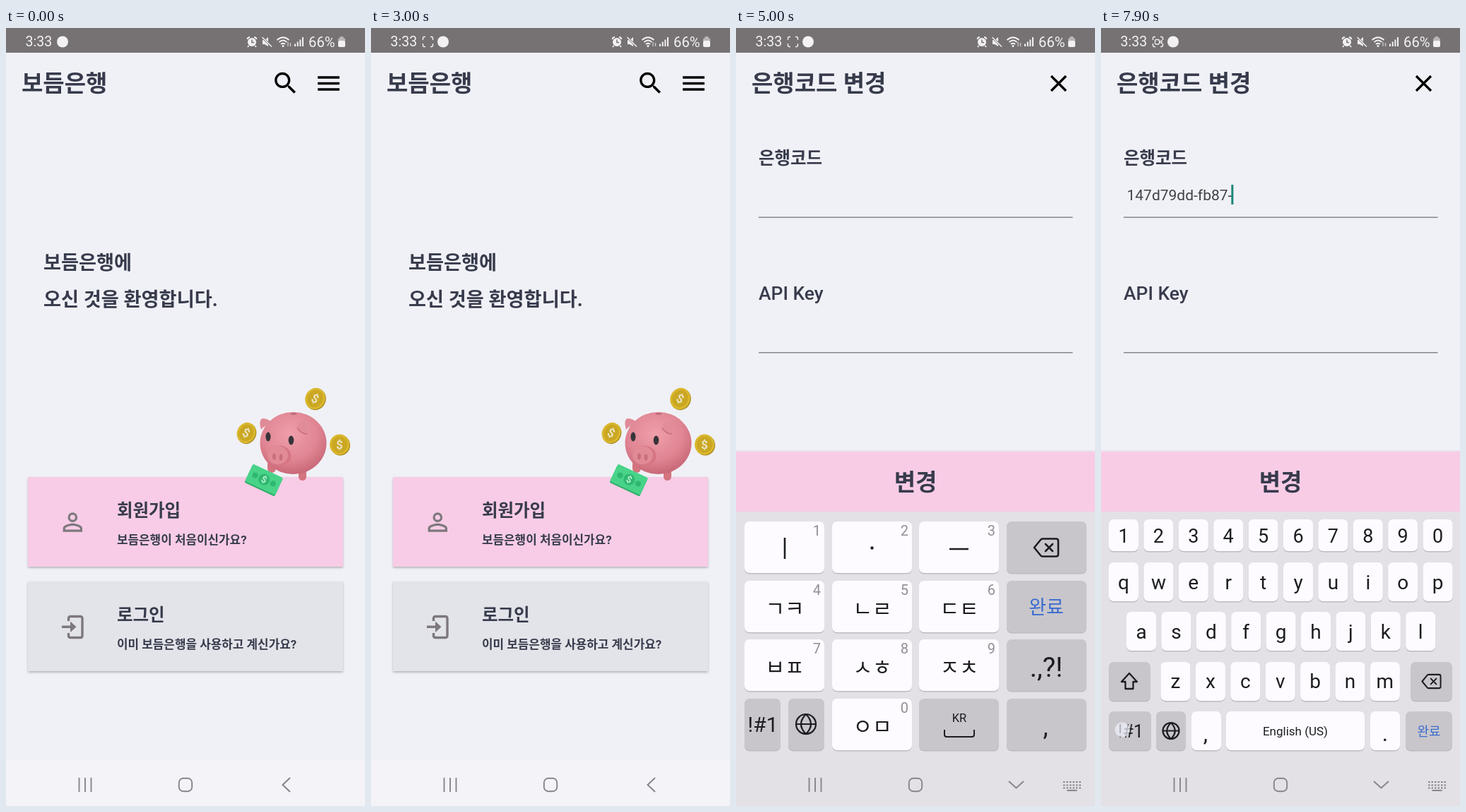
Write an HTML page that moves like this. It is 508 by 1102 pixels and loops after 8 s.

```html
<!DOCTYPE html>
<html lang="ko">
<head>
<meta charset="utf-8">
<title>보듬은행</title>
<style>
html, body { margin: 0; width: 100%; height: 100%; overflow: hidden; background: #f0f1f6; }
svg { display: block; width: 508px; height: 1102px; font-family: Roboto, "Noto Sans CJK KR", "Noto Sans CJK", sans-serif; }
text { white-space: pre; }
</style>
</head>
<body>
<svg id="stage" viewBox="0 0 508 1102" xmlns="http://www.w3.org/2000/svg"></svg>
<script>
const INK = '#373b4c', KEY = '#fdfbff', GREY = '#c8c6cb', DARK = '#1d1d20', BLUE = '#3a6bcf';
const LOOP = 8000;

// --- drawing helpers ---
const text = (x, y, size, str, fill = INK, weight = 400, anchor = 'start') =>
  `<text x="${x}" y="${y}" font-size="${size}" fill="${fill}" font-weight="${weight}" text-anchor="${anchor}">${str}</text>`;
// Hangul centred vertically on cy
const bold = (x, cy, size, str, anchor) => text(x, cy + size * .37, size, str, INK, 600, anchor);
const mid = (x, y, size, str, fill = DARK, weight) => text(x, y, size, str, fill, weight, 'middle');
const rect = (x, y, w, h, fill, rx = 0, extra = '') =>
  `<rect x="${x}" y="${y}" width="${w}" height="${h}" rx="${rx}" fill="${fill}" ${extra}/>`;
const oval = (x, y, rx, ry, fill, turn = 0) =>
  `<ellipse cx="${x}" cy="${y}" rx="${rx}" ry="${ry}" fill="${fill}" transform="rotate(${turn} ${x} ${y})"/>`;
const line = (d, color, w, extra = '') =>
  `<path d="${d}" fill="none" stroke="${color}" stroke-width="${w}" ${extra}/>`;
const icon = (x, y, d, fill = '#000') =>
  `<path transform="translate(${x} ${y}) scale(1.71)" d="${d}" fill="${fill}"/>`;
const group = (id, body) => `<g id="${id}">${body}</g>`;
const round = 'stroke-linecap="round" stroke-linejoin="round"';

// --- app pages ---
const menu = icon(436, 58, 'M3 18h18v-2H3v2zm0-5h18v-2H3v2zm0-7v2h18V6H3z');

const coin = (x, y, rx, ry, turn) =>
  oval(x + 1, y + 1, rx, ry, '#a98a1e', turn) + oval(x, y, rx, ry, '#d9b72e', turn) +
  oval(x, y, rx - 3, ry - 3, '#cba722', turn) +
  `<g transform="rotate(${turn} ${x} ${y})">${mid(x, y + 6, 17, '$', '#e9e2c0', 700)}</g>`;

const pig =
  coin(437.5, 525, 14, 15.5, 25) + coin(340, 573.5, 13, 15, 25) + coin(472, 590, 14, 14.5, 0) +
  rect(370, 612, 12, 18, '#d4747f', 6) + rect(414, 622, 11, 19, '#d4747f', 5.5) +
  oval(406.5, 588, 47, 44, 'url(#skin)') +
  `<path d="M361 569Q357 555 363 553Q372 553 378 561Q366 562 361 569Z" fill="#e08b97"/>` +
  `<path d="M411 566Q415 556 424 557Q429 567 426 575Q420 576 411 566Z" fill="#e18d99"/>` +
  line('M412 567Q420 576 426 575', '#c96b79', 1.5) +
  oval(407, 546.5, 4.5, 1.4, '#c06a78') +
  oval(371, 579, 3.5, 6.5, '#37343a') + oval(403.5, 584, 3.8, 6.5, '#37343a') +
  oval(386.5, 606, 17, 14.5, '#d67684') + oval(384.5, 605, 14.5, 13, '#e18b97') +
  oval(379.5, 607, 2.3, 4.5, '#c76d7b') + oval(389, 608, 2.3, 4.5, '#c76d7b') +
  `<g transform="translate(365 640) rotate(25)">` +
  rect(-23.5, -12, 47, 27, '#2eae68', 2) + rect(-23.5, -14, 47, 27, '#48d389', 2) +
  oval(0, -.5, 8, 8, '#2fb870') + oval(-14, -.5, 4, 4, '#2fb870') + oval(14, -.5, 4, 4, '#2fb870') +
  mid(0, 4, 13, '$', '#b9f3d2', 700) + `</g>`;

const card = (y, fill, title, note) =>
  rect(31, y, 446, 127, fill, 1, 'filter="url(#drop)"') + bold(157, y + 47, 24.5, title) + bold(157, y + 89, 16.9, note);

const home =
  bold(22, 78, 33, '보듬은행') + menu +
  icon(375, 57.7, 'M15.5 14h-.79l-.28-.27C15.41 12.59 16 11.11 16 9.5 16 5.91 13.09 3 9.5 3S3 5.91 3 9.5 5.91 16 9.5 16c1.61 0 3.09-.59 4.23-1.57l.27.28v.79l5 4.99L20.49 19l-4.99-5zm-6 0C7.01 14 5 11.99 5 9.5S7.01 5 9.5 5 14 7.01 14 9.5 11.99 14 9.5 14z') +
  bold(53, 332, 27.2, '보듬은행에') + bold(53, 384, 27.2, '오신 것을 환영합니다.') +
  card(636, '#f8cce6', '회원가입', '보듬은행이 처음이신가요?') +
  card(784, '#e3e4e9', '로그인', '이미 보듬은행을 사용하고 계신가요?') +
  icon(73.8, 679.5, 'M12 5.9a2.1 2.1 0 1 1 0 4.2a2.1 2.1 0 0 1 0-4.2m0 9c2.97 0 6.1 1.46 6.1 2.1v1.1H5.9V17c0-.64 3.13-2.1 6.1-2.1M12 4a4 4 0 1 0 0 8a4 4 0 0 0 0-8zm0 9c-2.67 0-8 1.34-8 4v3h16v-3c0-2.66-5.33-4-8-4z', '#7d787d') +
  line('M88.5 840V836.5q0-3 3-3H105q3 0 3 3V860.500q0 3-3 3H91.5q-3 0-3-3V857', '#7d787d', 3.4) +
  `<path d="M79 846.4H91V840.5L99.5 848.2L91 856V850H79Z" fill="#7d787d"/>` + pig;

const row = (y, label) =>
  bold(32, y, 24.5, label) + line(`M452 ${y - 10}L461 ${y - 1}L452 ${y + 8}`, '#a09da4', 3.5) +
  rect(32, y + 40.2, 445, 1.7, '#c9c9cf');

const settings =
  line('M45.5 69L37 78L45.5 87', '#000', 3.4) + bold(62, 78, 33, '설정') + menu +
  icon(374.5, 58, 'M12 5.69l5 4.5V18h-2v-6H9v6H7v-7.81l5-4.5M12 3L2 12h3v8h6v-6h2v6h6v-8h3L12 3z') +
  row(174, '알림설정') + row(280, '앱 환경설정') + row(386, '은행코드 변경 (관리자 전용)');

const form =
  bold(22, 78, 33, '은행코드 변경') + line('M446 68L467 89M467 68L446 89', '#000', 3.3) +
  bold(32, 184, 24.5, '은행코드') + rect(32, 267.4, 444.5, 1.6, '#8d8c94') +
  text(32, 385, 26.4, 'API Key', INK, 500) + rect(32, 459, 444.5, 1.6, '#8d8c94') +
  '<text id="typed" x="36.5" y="244" font-size="21" fill="#414148"></text>' +
  rect(0, 222, 3, 28, '#1b8576', 0, 'id="caret"');

// --- keyboards ---
const spots = {};
const cap = (x, y, w, h, fill = KEY) => rect(x, y + 1.5, w, h, '#bdbbc1', 7) + rect(x, y, w, h, fill, 7);
const globe = (x, y, r) =>
  line(`M${x - r} ${y}A${r} ${r} 0 1 1 ${x + r} ${y}A${r} ${r} 0 1 1 ${x - r} ${y}H${x + r}` +
    `M${x} ${y - r}Q${x - r} ${y} ${x} ${y + r}Q${x + r} ${y} ${x} ${y - r}`, DARK, 2.2);
const erase = (x, y, k) =>
  `<g transform="translate(${x} ${y}) scale(${k})">` +
  line('M-17 0L-8-11Q-7-12.5-5-12.5H14Q17-12.5 17-9.5V9.5Q17 12.5 14 12.5H-5Q-7 12.5-8 11ZM-1-5L9 5M9-5L-1 5', DARK, 2.6, round) + '</g>';

function hangulKeys() {
  const cols = [12, 136, 259, 383], rows = [699, 783, 866, 950];
  const labels = ['', '', '', 'ㄱㅋ', 'ㄴㄹ', 'ㄷㅌ', 'ㅂㅍ', 'ㅅㅎ', 'ㅈㅊ'];
  let out = '';
  const key = (x, y, label, digit) =>
    cap(x, y, 113, 73) + mid(x + 57, y + 50, 30, label) + text(x + 108, y + 20, 20, digit, '#918f95', 400, 'end');
  labels.forEach((s, i) => out += key(cols[i % 3], rows[i / 3 | 0], s, i + 1));
  out += line('M69 722V752M302 738H329', DARK, 2.6) + oval(192.5, 736.5, 2.2, 2.2, DARK);
  rows.slice(0, 3).forEach(y => out += cap(383, y, 113, 73, GREY));
  out += erase(439, 736, 1) + mid(439, 830, 27, '완료', BLUE) + mid(439, 919, 39, '.,?!');
  out += cap(12, 950, 51, 73, GREY) + mid(38, 997, 30, '!#1') + cap(74, 950, 51, 73, GREY) + globe(99, 986, 14);
  out += key(136, 950, 'ㅇㅁ', 0) + cap(259, 950, 113, 73, GREY) + mid(316, 983, 16.5, 'KR');
  out += line('M295 994V1001Q295 1004 298 1004H334Q337 1004 337 1001V994', DARK, 2);
  return out + cap(383, 950, 113, 73, GREY) + mid(438, 1002, 36, ',');
}

function latinKeys() {
  let out = '';
  [['1234567890', 11, 696, 45, 27, 33], ['qwertyuiop', 11, 757, 55, 28, 38],
   ['asdfghjkl', 36, 827, 55, 28, 38], ['zxcvbnm', 84.5, 898, 55, 28, 37]].forEach(([chars, x0, y, h, size, base]) => {
    [...chars].forEach((c, i) => {
      const x = x0 + i * 49.4;
      spots[c] = [x + 21, y + h / 2];
      out += cap(x, y, 42, h) + mid(x + 21, y + base, size, c);
    });
  });
  out += cap(11, 898, 59, 55, GREY) + line('M40 914L51 926H45.5V936H34.5V926H29Z', DARK, 2.3, round);
  out += cap(438, 898, 59, 55, GREY) + erase(467.5, 925.5, .77);
  out += cap(11, 968, 60, 55, GREY) + mid(42, 1005, 25, '!#1') + cap(78, 968, 42, 55, GREY) + globe(99, 995.5, 11.5);
  out += cap(128, 968, 42, 55) + mid(148, 1010, 32, ',') + cap(177, 968, 196, 55) + mid(275, 1001.5, 17, 'English (US)');
  out += cap(381, 968, 42, 55) + mid(402, 1010, 32, '.') + cap(431, 968, 66, 55, GREY);
  return out + mid(464, 1002.5, 18, '완료', BLUE);
}

const panel =
  rect(0, 598, 508, 2, '#e9e4ec') + rect(0, 600, 508, 85, '#f9cce6') + bold(254, 642.5, 33, '변경', 'middle') +
  rect(0, 685, 508, 417, '#e3e1e6') + group('hangul', hangulKeys()) + group('latin', latinKeys());

// --- system bars ---
const NAV = '#87848b';
const nav =
  rect(0, 1037, 508, 65, '#f4f3f8', 0, 'id="navbg"') +
  line('M103.5 1062V1082M112 1062V1082M120.5 1062V1082', NAV, 1.9) +
  rect(244.8, 1062.8, 18.4, 18.4, 'none', 6, `stroke="${NAV}" stroke-width="1.9"`) +
  group('back', line('M402 1062L391.5 1072L402 1082', NAV, 2)) +
  group('hide', line('M386 1067L396.5 1076.5L407 1067', NAV, 2) +
    line('M463 1068H488M463 1072.5H488M463 1076.5H488', NAV, 2, 'stroke-dasharray="2.5 2"') +
    line('M468.5 1080H482.5', NAV, 2));

const PALE = '#f3f1f2', BAR = '#767274';
const status =
  rect(0, 0, 508, 35, BAR) + text(27.5, 26, 19.5, '3:33', PALE) + text(428, 26.5, 20.3, '66%', PALE) +
  `<circle id="carrier" cx="80" cy="19.5" r="8" fill="${PALE}"/>` +
  group('rec', line('M73.5 17V14.5Q73.5 12.5 75.5 12.5H77M84 12.5H85.5Q87.5 12.5 87.5 14.5V17M87.5 22V24.5Q87.5 26.5 85.5 26.5H84M77 26.5H75.5Q73.5 26.5 73.5 24.5V22', PALE, 1.4)) +
  group('cam', rect(76.5, 16.5, 6, 6.5, 'none', 1.5, `stroke="${PALE}" stroke-width="1.3"`) +
    line('M83 19.8L86 17.5V22Z', PALE, 1.1)) +
  oval(348, 20, 6, 6, PALE) + line('M341.5 16Q342 13 345 13M351 13Q354 13 354.5 16M343.5 25L342 27M352.5 25L354 27', PALE, 1.8) +
  line('M348 16.5V20.5H351', BAR, 1.5) +
  `<path d="M363 17H366L371 13V26L366 23H363Z" fill="${PALE}"/>` + line('M362 12.5L376 26.5', BAR, 3) +
  line('M362.5 13L376 26.5', PALE, 1.5) +
  line('M383.5 17Q392 9.5 400.5 17M386.5 20Q392 15 397.5 20M389 23Q392 20.5 395 23', PALE, 1.7) +
  oval(392, 25.5, 1.5, 1.5, PALE) + line('M399 26V20M402.5 21V26', '#cfcccd', 1.3) +
  line('M409 26V22.5M412.7 26V19.5M416.4 26V16.5M420 26V13', PALE, 2) +
  rect(472.5, 12, 5, 3, '#b9b6b7', 1) + rect(470, 14, 10, 13, '#b9b6b7', 2.5) + rect(470, 18, 10, 9, PALE, 2.5);

const stage = document.getElementById('stage');
stage.innerHTML =
  `<defs><radialGradient id="skin" cx=".45" cy=".35" r=".7"><stop offset="0" stop-color="#ef9fab"/>` +
  `<stop offset=".6" stop-color="#e08593"/><stop offset="1" stop-color="#c56272"/></radialGradient>` +
  `<filter id="drop" x="-5%" y="-10%" width="110%" height="125%"><feDropShadow dx="0" dy="1.8" stdDeviation="1.6" flood-opacity=".25"/></filter></defs>` +
  rect(0, 0, 508, 1102, '#f0f1f6') + group('home', home) + group('settings', settings) + group('form', form) +
  group('panel', panel) + group('nav', nav) + group('status', status) +
  '<circle id="dot" r="10.5" fill="#eef0fa" fill-opacity=".72" stroke="#d5d6e2" stroke-opacity=".6"/>';

// --- timeline ---
const el = id => document.getElementById(id);
const show = (id, on) => el(id).style.display = on ? '' : 'none';
const CODE = '147d79dd-fb87-';
const PRESS = [5350, 5560, 5760, 5960, 6160, 6360, 6460, 6520, 6580, 6760, 6960, 7360, 7560, 7780];
const T = { rec: 450, settings: 3350, form: 4050, rise: 4150, up: 4400, latin: 5180 };

function draw(t) {
  const n = PRESS.filter(p => p <= t).length;
  const open = t >= T.form, keys = t >= T.rise;
  show('home', t < T.settings);
  show('settings', t >= T.settings && !open);
  show('form', open);
  show('panel', open);
  show('hangul', t < T.latin);
  show('latin', t >= T.latin);
  show('back', !keys);
  show('hide', keys);
  el('navbg').setAttribute('fill', keys ? '#e3e1e6' : '#f4f3f8');

  const p = Math.min(1, Math.max(0, (t - T.rise) / (T.up - T.rise)));
  el('panel').setAttribute('transform', `translate(0 ${352 * (1 - p) ** 3})`);

  const rec = t >= T.rec;
  show('rec', rec);
  show('cam', rec && t % 1000 >= 800);
  el('carrier').setAttribute('cx', rec ? 102 : 80);

  const typed = el('typed');
  typed.textContent = CODE.slice(0, n);
  show('caret', n > 0);
  if (n) el('caret').setAttribute('x', 35.5 + typed.getComputedTextLength());

  let tap = n && t - PRESS[n - 1] < 90 ? spots[CODE[n - 1]] : null;
  if (t >= 7850) tap = [30, 994];
  show('dot', tap);
  if (tap) {
    el('dot').setAttribute('cx', tap[0]);
    el('dot').setAttribute('cy', tap[1]);
  }
}

const start = performance.now();
function tick() {
  draw((performance.now() - start) % LOOP);
  requestAnimationFrame(tick);
}
tick();
</script>
</body>
</html>
```
